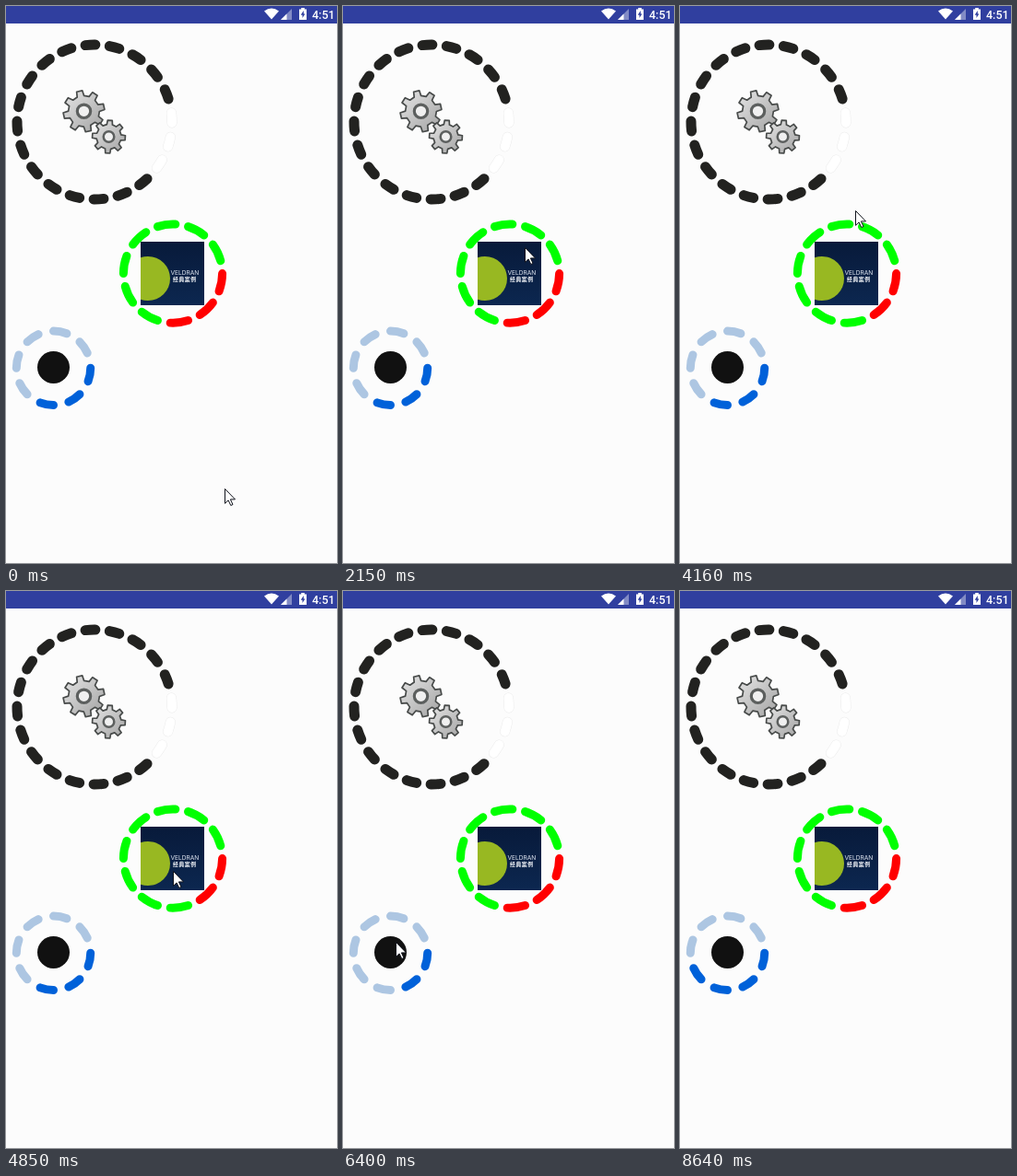
These frames come from a looping animation (359x605 px, 9.27 s). An HTML page:

```html
<!DOCTYPE html>
<html lang="en">
<head>
<meta charset="utf-8">
<title>Segmented rings</title>
<style>
  html, body { margin: 0; width: 100%; height: 100%; overflow: hidden; background: #fcfcfc; }
  svg { display: block; width: 100%; height: 100%; }
  .clock { font: 500 12.5px Roboto, sans-serif; fill: #fff; }
  .title { font: 400 6.6px Inter, sans-serif; fill: #e6ebf5; }
  .sub { font: 700 5.8px "Noto Sans CJK SC", "Noto Sans CJK", sans-serif; letter-spacing: .6px; fill: #f4f6fa; }
</style>
</head>
<body>
<svg viewBox="0 0 359 605" xmlns="http://www.w3.org/2000/svg">
  <defs>
    <linearGradient id="steel" x1="0" y1="0" x2="1" y2="1">
      <stop offset="0" stop-color="#e6e6e6"/>
      <stop offset="1" stop-color="#a2a2a2"/>
    </linearGradient>
    <linearGradient id="navy" x1="0" y1="0" x2="0" y2="1">
      <stop offset="0" stop-color="#081a3a"/>
      <stop offset="1" stop-color="#0c2750"/>
    </linearGradient>
    <clipPath id="cardClip"><rect x="146" y="256" width="69" height="69"/></clipPath>
  </defs>

  <rect width="359" height="605" fill="#fcfcfc"/>
  <rect width="359" height="19" fill="#303f9f"/>
  <g fill="#fff">
    <path d="M280 5.6Q288 -.6 296 5.6L288 14.6Z"/>
    <path d="M310 3V15H298Z" opacity=".4"/>
    <path d="M304.5 8.5V15H298Z"/>
    <path d="M318 3.5H320.2V2H323.8V3.5H326V15H318Z"/>
  </g>
  <path d="M322.8 5L319.7 9.7H321.5V13L324.4 8.5H322.8Z" fill="#303f9f"/>
  <text class="clock" x="332" y="14">4:51</text>

  <g id="gears"></g>

  <g clip-path="url(#cardClip)">
    <rect x="146" y="256" width="69" height="69" fill="url(#navy)"/>
    <circle cx="154" cy="296" r="24" fill="#98b822"/>
  </g>
  <text class="title" x="178.5" y="292">VELDRAN</text>
  <text class="sub" x="181" y="299">经典案例</text>

  <circle cx="51.5" cy="392.5" r="17.5" fill="#111"/>

  <g id="rings" fill="none" stroke-linecap="round"></g>

  <path id="cursor" d="M.5 .5V16.3L4.1 12.9L6.8 18.5L9 17.5L6.4 11.9H11.5Z"
        fill="#fff" stroke="#10131c" stroke-linejoin="round"/>
</svg>
<script>
const LOOP = 9270, TICK = 77.1, LEAD = 20, EXIT = 112;

const big = { cx: 96, cy: 126, r: 84, n: 20, start: -6.8, sweep: 7.4, width: 11,
  on: '#222220', off: '#ffffff', rim: '#ebebeb' };
const mid = { cx: 181, cy: 290.6, r: 53.6, n: 10, start: 0, sweep: 21, width: 9,
  on: '#00ff00', off: '#ff0000' };
const small = { cx: 51.5, cy: 393.3, r: 40.2, n: 8, start: 0, sweep: 21, width: 9,
  on: '#adc6e2', off: '#0061d9' };
const rings = [big, mid, small];

// Turning points of the pointer: tick, x, y and, where a swipe ends, its ring.
const turns = [
  [0, 237, 524], [7, 104, 103], [15, 104, 232, big], [17, 87, 237], [23, 100, 64, big],
  [28, 197, 262], [35, 188, 393, mid], [45, 194, 268], [46, 186, 371, mid],
  [53, 190, 220, mid], [63, 181, 304], [69, 185, 210, mid], [73, 58, 376],
  [79, 58, 479, small], [84, 57, 370], [87, 58, 447, small], [92, 54, 370, small],
  [96, 52, 383], [102, 48, 330, small], [105, 56, 410], [107, 58, 327, small],
  [111, 179, 478]
];

const $ = id => document.getElementById(id);

function add(parent, tag, attrs) {
  const el = document.createElementNS('http://www.w3.org/2000/svg', tag);
  for (const key in attrs) el.setAttribute(key, attrs[key]);
  return parent.appendChild(el);
}

function polar(cx, cy, r, deg) {
  const a = deg * Math.PI / 180;
  return (cx + r * Math.cos(a)).toFixed(2) + ' ' + (cy + r * Math.sin(a)).toFixed(2);
}

function drawGear(cx, cy, outer, turn) {
  const teeth = 8, root = outer * 0.75, points = [];
  for (let i = 0; i < teeth; i++) {
    const a = turn + i * 360 / teeth;
    points.push(polar(cx, cy, root, a - 13), polar(cx, cy, outer, a - 8),
                polar(cx, cy, outer, a + 8), polar(cx, cy, root, a + 13));
  }
  const g = $('gears');
  add(g, 'path', { d: 'M' + points.join('L') + 'Z', fill: 'url(#steel)',
    stroke: '#484b4a', 'stroke-width': 1.7, 'stroke-linejoin': 'round' });
  add(g, 'circle', { cx, cy, r: outer * 0.32, fill: '#f0f0f0', stroke: '#5c5f5e',
    'stroke-width': outer * 0.14 });
}

function buildRing(ring) {
  const { cx, cy, r, n, start, sweep, width, rim } = ring;
  ring.dashes = Array.from({ length: n }, (_, i) => {
    const a = start + i * 360 / n;
    const d = `M${polar(cx, cy, r, a)}A${r} ${r} 0 0 1 ${polar(cx, cy, r, a + sweep)}`;
    const under = rim && add($('rings'), 'path', { d, stroke: rim, 'stroke-width': width });
    return { under, top: add($('rings'), 'path', { d, 'stroke-width': width }) };
  });
}

// Each finished swipe moves its ring one segment: down fills, up empties.
function offCount(ring, tick) {
  return turns.reduce((off, [t, , y, target], i) =>
    target === ring && t <= tick ? off + Math.sign(turns[i - 1][2] - y) : off, 3);
}

function paintRing(ring, tick) {
  const off = offCount(ring, tick);
  ring.dashes.forEach(({ under, top }, i) => {
    top.setAttribute('stroke', i < off ? ring.off : ring.on);
    if (under) top.setAttribute('stroke-width', ring.width - (i < off ? 1 : 0));
    if (under) under.setAttribute('visibility', i < off ? 'visible' : 'hidden');
  });
}

function pointerAt(tick) {
  const i = turns.findIndex(p => p[0] > tick);
  if (i < 0) return turns[turns.length - 1].slice(1, 3);
  const [t0, x0, y0] = turns[i - 1], [t1, x1, y1] = turns[i];
  const k = (tick - t0) / (t1 - t0), ease = k * k * (3 - 2 * k);
  return [Math.round(x0 + (x1 - x0) * ease), Math.round(y0 + (y1 - y0) * ease)];
}

function render(time) {
  const tick = Math.floor((time % LOOP + LEAD) / TICK);
  rings.forEach(ring => paintRing(ring, tick));
  const [x, y] = pointerAt(tick);
  $('cursor').setAttribute('transform', `translate(${x} ${y})`);
  $('cursor').setAttribute('visibility', tick < EXIT ? 'visible' : 'hidden');
}

drawGear(84.5, 114.3, 22.5, -12.5);
drawGear(111.5, 142, 18, 4);
rings.forEach(buildRing);

const begin = performance.now();
function loop() {
  render(performance.now() - begin);
  requestAnimationFrame(loop);
}
loop();
</script>
</body>
</html>
```
